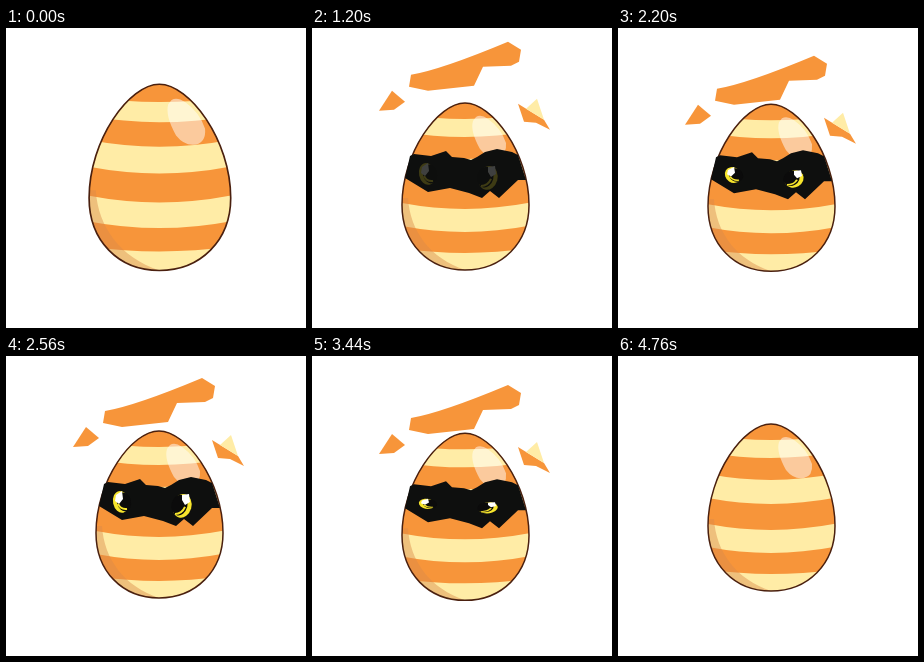
Animation of 300x300 px, one loop 4.8 s. Source, as an HTML page:

```html
<!DOCTYPE html>
<html lang="en">
<head>
<meta charset="utf-8">
<title>Hatching egg</title>
<style>
  html, body { margin: 0; width: 100%; height: 100%; overflow: hidden; background: #fff; }
  svg { display: block; width: 100vw; height: 100vh; }
</style>
</head>
<body>
<svg viewBox="0 0 300 300">
  <defs>
    <path id="shell" d="M153 68C180 68 217 118 217 170C217 208 190 235 153 235C116 235 90 208 90 170C90 118 126 68 153 68Z"/>
    <clipPath id="inside"><use href="#shell"/></clipPath>
  </defs>
  <g id="egg">
    <g clip-path="url(#inside)">
      <g id="stripes"></g>
      <path fill="#d98a4a" fill-opacity=".45" d="M80 163H96C98 196 118 223 153 235V245H80Z"/>
      <path fill="#fff" fill-opacity=".5" d="M164 82Q169 79 176 84Q189 93 194 108Q195 120 186 122Q176 124 168 114Q158 96 161 86Z"/>
    </g>
    <use href="#shell" fill="none" stroke="#4a200f" stroke-width="1.5"/>
    <g id="mask">
      <path fill="#0e0f0e" d="M98 121L102 119L119 121L134 116L140 122L152 123L159 125L165 122L173 117L185 114L200 117L206 120L208 126L214 145L206 145L187 163L178 156L170 163L157 158L138 153L116 157L93 143Z"/>
      <g id="eyes">
        <g class="eye" data-y="138">
          <ellipse cx="115" cy="139" rx="8" ry="11" fill="#f7e52c" transform="rotate(-12 115 139)"/>
          <ellipse cx="118" cy="139" rx="7" ry="9.5" fill="#0b0b0b" transform="rotate(-12 118 139)"/>
          <path d="M110 132L116 128L117 136L113 141L109 138Z" fill="#fff"/>
          <path d="M112 141Q115 147 121 146" fill="none" stroke="#f7e52c" stroke-width="2"/>
        </g>
        <g class="eye" data-y="142">
          <ellipse cx="176" cy="143" rx="9.5" ry="12" fill="#f7e52c" transform="rotate(15 176 143)"/>
          <ellipse cx="173.500" cy="142" rx="8" ry="10.500" fill="#0b0b0b" transform="rotate(15 173 142)"/>
          <path d="M176 132L183 131L184 139L179 142L176 137Z" fill="#fff"/>
          <path d="M179 144Q176 151 169 151" fill="none" stroke="#f7e52c" stroke-width="2"/>
        </g>
      </g>
    </g>
  </g>
  <g id="pieces" fill="#f7953a">
    <path d="M196 11L209 19L207 31L199 35L171 36L162 55L116 60L97 56L99 44Q129 39 196 11Z"/>
    <path d="M80 60L93 71L82 79L67 80Z"/>
    <path d="M206 73L232 89L238 99L224 92L212 91Z"/>
    <path d="M225 68L214 78L232 89Z" fill="#ffeca6"/>
  </g>
</svg>
<script>
const LOOP = 4800, START = 920, MIDDLE = 2840, BOB = 960;
const $ = id => document.getElementById(id);
const clamp = v => Math.min(1, Math.max(0, v));
const ease = p => (1 - Math.cos(Math.PI * clamp(p))) / 2;

// Stripe lower edges: centre height and sag, painted bottom up.
const edges = [[84, 6], [102, 7], [124, 8], [148, 8], [174, 8], [197, 8], [218, 6], [250, 0]];
$('stripes').innerHTML = edges.map(([y, sag], i) =>
  `<path fill="${i % 2 ? '#ffeca6' : '#f7953a'}" d="M80 50V${y - sag}Q153 ${y + sag} 226 ${y - sag}V50Z"/>`
).reverse().join('');

// Settling swing of the broken pieces: time and height.
const swing = [[1100, 30], [1230, 3.8], [1560, 26.8], [1900, 9.5], [2230, 19.7], [2550, 15], [2840, 17.8]];
function swingAt(t) {
  const i = swing.findIndex(key => key[0] > t);
  if (i < 0) return swing[swing.length - 1][1];
  if (i === 0) return swing[0][1];
  const [t0, y0] = swing[i - 1], [t1, y1] = swing[i];
  return y0 + (y1 - y0) * ease((t - t0) / (t1 - t0));
}

function swell(t) {
  if (t < 560) return 1.115 + 0.1 * ease(t / 560);
  return 1 + 0.215 * (1 - ease((t - 560) / (START - 560)));
}

function draw(t) {
  const hatching = t >= START;
  const folded = t > MIDDLE ? 2 * MIDDLE - t : t; // the second half runs backwards
  const bob = hatching ? 5.5 * (1 - Math.cos(2 * Math.PI * (t - START) / BOB)) : 0;
  const scale = hatching ? 1 : swell(t);
  const shown = clamp((folded - 1040) / 60);
  const lid = 1 - 0.8 * clamp(1 - Math.abs(folded - 2280) / 120);

  $('egg').setAttribute('transform', `translate(150 ${170 + bob}) scale(${scale}) translate(-150 -170)`);
  $('pieces').setAttribute('transform', `translate(0 ${swingAt(folded) + bob - 11})`);
  $('pieces').setAttribute('opacity', shown);
  $('mask').setAttribute('opacity', shown);
  $('eyes').setAttribute('opacity', clamp((folded - 1160) / 200));
  for (const eye of document.querySelectorAll('.eye')) {
    const y = eye.dataset.y;
    eye.setAttribute('transform', `translate(0 ${y}) scale(1 ${lid}) translate(0 ${-y})`);
  }
}

function tick() {
  draw(performance.now() % LOOP);
  requestAnimationFrame(tick);
}
tick();
</script>
</body>
</html>
```
